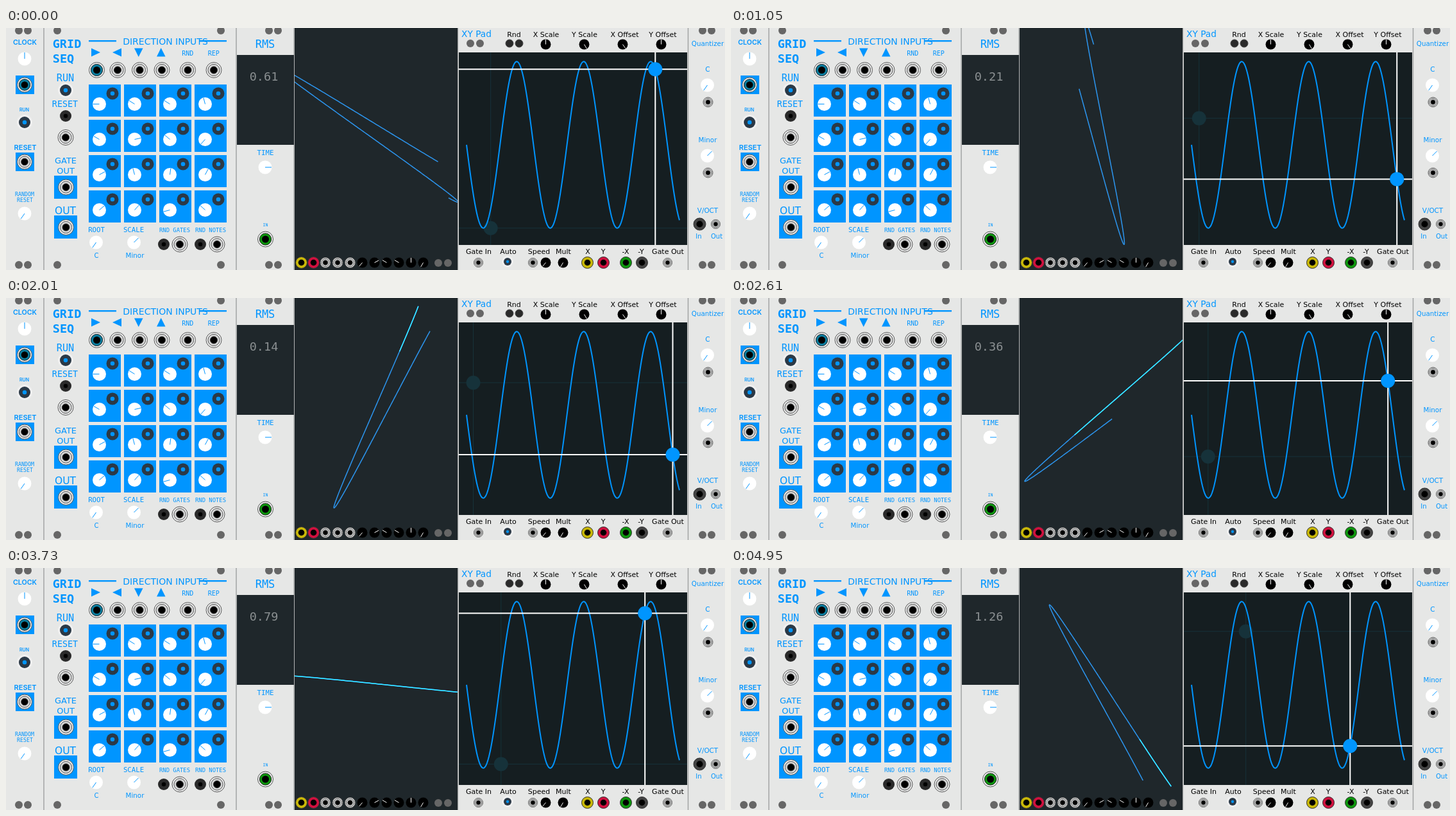
These frames come from a looping animation (1121 by 377 pixels, 5.05 s). An HTML page with a canvas:

```html
<!DOCTYPE html>
<html lang="en">
<head>
<meta charset="utf-8">
<title>Modular rack</title>
<style>
html, body { margin: 0; width: 100%; height: 100%; overflow: hidden; background: #e6e7e6; }
canvas { display: block; }
</style>
</head>
<body>
<canvas id="stage" width="1121" height="377"></canvas>
<script>
const W = 1121, H = 377, LOOP = 5050, TRAIL = 3900, TURN = 1550;
const BLUE = '#0095ff', PANEL = '#e6e7e6', SCREEN = '#1f272b', PAD = '#151e21';
const SANS = '"DejaVu Sans", sans-serif', MONO = '"DejaVu Sans Mono", monospace';
const ROUND = 'Inter, sans-serif';
const view = document.getElementById('stage').getContext('2d');
const rack = document.createElement('canvas');
rack.width = W;
rack.height = H;
let g = rack.getContext('2d');

// ---- drawing helpers ----
function box(x, y, w, h, fill) {
  g.fillStyle = fill;
  g.fillRect(x, y, w, h);
}

function disc(x, y, r, fill, edge, width = 1) {
  g.beginPath();
  g.arc(x, y, r, 0, Math.PI * 2);
  if (fill) { g.fillStyle = fill; g.fill(); }
  if (edge) { g.strokeStyle = edge; g.lineWidth = width; g.stroke(); }
}

function line(x1, y1, x2, y2, color, width) {
  g.beginPath();
  g.moveTo(x1, y1);
  g.lineTo(x2, y2);
  g.strokeStyle = color;
  g.lineWidth = width;
  g.stroke();
}

function label(text, x, y, size, font = SANS, color = BLUE, weight = '') {
  g.font = `${weight} ${size}px ${font}`;
  g.textAlign = 'center';
  g.fillStyle = color;
  g.fillText(text, x, y);
}

function knob(x, y, deg, r = 10.5, fill = '#fff', mark = BLUE) {
  const a = deg * Math.PI / 180;
  disc(x, y, r, fill);
  line(x, y, x + Math.sin(a) * r * 0.95, y - Math.cos(a) * r * 0.95, mark, 1);
}

function smallKnob(x, y, deg) {
  knob(x, y, deg, 8, '#000', '#fff');
}

function jack(x, y, r = 12, ring) {
  disc(x, y, r, '#eceded', '#555');
  disc(x, y, r * 0.76, ring || '#d4d5d5', ring ? '#222' : '#555');
  disc(x, y, r * 0.46, '#000', ring ? null : '#333');
}

function plug(x, y, color, r = 9) {
  disc(x, y, r, color, '#333');
  disc(x, y, r * 0.53, '#000');
}

function button(x, y, r, lit) {
  if (lit) disc(x, y, r + 3, 'rgba(255,255,255,0.4)');
  disc(x, y, r, lit ? '#2b3946' : '#2a2a2a');
  disc(x, y, r * 0.36, lit ? BLUE : '#000');
}

function poly(...p) {
  g.beginPath();
  for (let i = 0; i < p.length; i += 2) g.lineTo(p[i], p[i + 1]);
  g.fillStyle = BLUE;
  g.fill();
}

function dots(y, ...xs) {
  for (const x of xs) disc(x, y, 6, '#666');
}

// ---- modules ----
function drawClock() {
  dots(4, 20, 34);
  dots(369, 20, 34);
  label('CLOCK', 29.5, 26, 10.7, ROUND, BLUE, 600);
  knob(29, 48, 0);
  box(15, 74, 29, 29, BLUE);
  jack(29, 88.5, 11.5, '#0b7d9f');
  label('RUN', 28.5, 130, 7, ROUND, BLUE, 600);
  button(29, 147, 9, true);
  label('RESET', 30, 190, 11, ROUND, BLUE, 600);
  box(15, 194, 29, 29, BLUE);
  jack(29, 208.5, 11.5);
  label('RANDOM', 29, 262, 8.3, MONO);
  label('RESET', 29.5, 271, 8.3, MONO);
  knob(29, 289, -145);
}

function drawGrid() {
  dots(4, 80, 335);
  dots(369, 80, 335);
  label('GRID', 95, 31, 18.5, MONO, BLUE, 'bold');
  label('SEQ', 89.5, 54, 18.5, MONO, BLUE, 'bold');
  label('DIRECTION INPUTS', 248.5, 26, 12.7 + 1.3, MONO.replace(' Mono', '').replace('monospace', 'sans-serif'));
  box(129, 19, 43, 2.4, BLUE);
  box(302, 19, 42, 2.4, BLUE);
  poly(133, 31.5, 147, 38, 133, 44.5);
  poly(180, 31.5, 166, 38, 180, 44.5);
  poly(200, 31.5, 213.5, 31.5, 206.7, 45);
  poly(235, 44.5, 248.5, 44.5, 241.7, 31);
  label('RND', 283.2, 43, 10, MONO);
  label('REP', 323.7, 43, 10, MONO);
  jack(141.5, 65.5, 12, '#0b7d9f');
  for (const x of [174, 208.5, 243, 283.5, 324]) jack(x, 65.5);

  label('RUN', 92.5, 83, 15.3, MONO);
  button(93, 97, 9, true);
  label('RESET', 92, 123, 13.4, MONO);
  button(93, 137, 9);
  jack(93, 170.5);
  label('GATE', 93, 211, 13);
  label('OUT', 93, 227, 13);
  box(75, 230, 36, 36, BLUE);
  jack(93.5, 248);
  label('OUT', 92.5, 290, 15.5);
  box(75, 292, 36, 36, BLUE);
  jack(93.5, 310.5);

  const turns = [
    [-90, -58, -58, -15],
    [-60, 78, -50, -138],
    [62, -15, 8, 28],
    [50, 42, -105, -48]
  ];
  turns.forEach((row, j) => row.forEach((deg, i) => {
    const x = 129 + 55 * i, y = 88 + 55 * j;
    box(x, y, 50, 50, BLUE);
    knob(x + 16.5, y + 30.5, deg);
    disc(x + 37, y + 14, 9.5, '#2b3946');
    disc(x + 37, y + 14, 3.3, BLUE);
  }));

  label('ROOT', 141, 318, 10.7, MONO);
  label('SCALE', 199, 318, 10.7, MONO);
  knob(140.5, 334, -145);
  knob(199.5, 334, 45);
  label('C', 141, 358, 10);
  label('Minor', 201, 358, 10.3);
  label('RND GATES', 263, 318, 8.9, MONO);
  label('RND NOTES', 319, 318, 8.9, MONO);
  button(246, 337, 9);
  jack(271, 337);
  button(303, 337, 9);
  jack(329, 337);
}

function drawMeter() {
  dots(4, 410, 424);
  dots(369, 410, 424);
  label('RMS', 404, 31, 17, MONO);
  box(360, 42, 89, 140, SCREEN);
  label('TIME', 404.5, 198, 10.8, MONO);
  knob(404, 217, 90);
  label('IN', 404.5, 309, 6.6, MONO);
  jack(404.5, 329, 12, '#0d960d');
}

function drawScopeControls() {
  plug(460.5, 365.5, '#c9b808');
  plug(479.5, 365.5, '#d0103f');
  for (const x of [498, 517, 536.5]) jack(x, 365.5, 8);
  [-140, 62, -60, -60, 0, -150].forEach((deg, i) => smallKnob(555.5 + 19 * i, 365.5, deg));
  dots(366, 674, 689);
}

function drawPadPanel() {
  const ink = (text, x, y) => label(text, x, y, 11, SANS, '#000');
  label('XY Pad', 733.5, 14, 13.7);
  dots(24, 724, 739);
  ink('Rnd', 792, 14);
  ink('X Scale', 842, 14);
  ink('Y Scale', 902, 14);
  ink('X Offset', 964.5, 14);
  ink('Y Offset', 1024, 14);
  for (const x of [785, 800]) disc(x, 24, 6, '#2a2a2a', '#444');
  smallKnob(841.5, 25.5, 0);
  smallKnob(901.5, 25.5, 150);
  smallKnob(961.5, 25.5, 145);
  smallKnob(1021.5, 25.5, 0);
  box(706, 38, 356, 300, PAD);

  ink('Gate In', 737, 352);
  ink('Auto', 783, 352);
  ink('Speed', 831, 352);
  ink('Mult', 869, 352);
  ink('X', 907, 352);
  ink('Y', 931, 352);
  ink('-X', 966, 352);
  ink('-Y', 990, 352);
  ink('Gate Out', 1032, 352);
  for (const x of [736.5, 821.5, 1031.5]) jack(x, 365.5, 7);
  button(782, 364, 6, true);
  smallKnob(841.5, 365.5, -140);
  smallKnob(868.5, 365.5, -150);
  plug(906.5, 365.5, '#c9b808');
  plug(931.5, 365.5, '#d0103f');
  plug(966.5, 365.5, '#0d960d');
  plug(991.5, 365.5, '#444');
}

function drawQuantizer() {
  dots(4, 1086, 1100);
  dots(369, 1086, 1100);
  label('Quantizer', 1094, 28, 10.3);
  label('C', 1094, 68, 10.5);
  knob(1093.5, 89, -145);
  jack(1094.5, 115.5, 7.5);
  label('Minor', 1094, 178, 10.3);
  knob(1093.5, 199, 45);
  jack(1094.5, 225.5, 7.5);
  label('V/OCT', 1094, 288, 10.4);
  plug(1081.5, 305.5, '#444', 9.5);
  jack(1106.5, 305.5, 7);
  label('In', 1080, 328, 10);
  label('Out', 1108, 328, 10);
}

function drawRack() {
  box(0, 0, W, H, PANEL);
  for (const x of [59, 359, 449, 704.5, 1063.5]) line(x, 0, x, H, '#a2a4a4', 1.5);
  g.clearRect(450, 0, 254, H);
  drawClock();
  drawGrid();
  drawMeter();
  drawScopeControls();
  drawPadPanel();
  drawQuantizer();
}

// ---- motion ----
const travel = [[-4000, 912.4], [0, 1012.3], [1050, 1038.25], [1520, 1050], [1580, 1050],
  [2010, 1039.24], [2610, 1024.2], [3730, 996.2], [4420, 978.2], [4950, 965.3]];
const level = [[0, 0.61], [1050, 0.21], [1610, 0.005], [2010, 0.14], [2610, 0.36],
  [3730, 0.79], [4420, 1.05], [4950, 1.26]];
const spin = [[0, -236.6], [1050, -193.2], [2010, -153.95], [2610, -128.9],
  [3730, -82], [4420, -53.1], [4950, -30.92]];

function at(keys, t) {
  let i = 1;
  while (i < keys.length - 1 && t > keys[i][0]) i++;
  const [t0, a] = keys[i - 1], [t1, b] = keys[i];
  return a + (b - a) * (t - t0) / (t1 - t0);
}

// The display refreshes in steps: [first, last, count]
const ticks = [0];
for (const [a, b, n] of [[60, 530, 6], [610, 1050, 6], [1140, 1660, 7], [1740, 2180, 6],
  [2270, 2780, 7], [2870, 3390, 7], [3470, 3990, 7], [4070, 4510, 6], [4600, 4950, 5]]) {
  for (let i = 0; i < n; i++) ticks.push(Math.round((a + (b - a) * i / (n - 1)) / 10) * 10);
}

const wave = x => 182 + 129.7 * Math.sin((x - 718) / 104.4 * Math.PI * 2);

function trace(from, to, angle) {
  if (to <= from) return;
  const c = Math.cos(angle), s = Math.sin(angle);
  g.beginPath();
  const n = Math.ceil((to - from) / 12);
  for (let i = 0; i <= n; i++) {
    const x = at(travel, from + (to - from) * i / n);
    const u = 0.39 * (x - 1005.1) - 1.4;
    const v = 1.377 * (wave(x) - 52) - 153.8;
    g.lineTo(576.5 + c * u - s * v, 188.2 + s * u + c * v);
  }
  g.stroke();
}

function drawScope(t) {
  const angle = at(spin, t) * Math.PI / 180;
  box(449, 0, 256, H, SCREEN);
  g.save();
  g.beginPath();
  g.rect(449, 0, 256, H);
  g.clip();
  // Additive strokes: the retraced part glows cyan
  g.globalCompositeOperation = 'lighter';
  g.strokeStyle = 'rgb(12,110,196)';
  g.lineWidth = 1.5;
  g.lineJoin = 'round';
  trace(t - TRAIL, Math.min(t, TURN), angle);
  trace(Math.max(t - TRAIL, TURN), t, angle);
  g.restore();
}

function drawPad(t) {
  const x = at(travel, t), y = wave(x), gx = 1768 - x, gy = 376 - y;
  g.save();
  g.beginPath();
  g.rect(706, 38, 356, 300);
  g.clip();
  line(706, gy, 1062, gy, '#16323a', 1);
  line(gx, 38, gx, 338, '#16323a', 1);
  disc(gx, gy, 11, '#16323a');
  g.beginPath();
  for (let px = 718; px <= 1050; px++) g.lineTo(px, wave(px));
  g.strokeStyle = BLUE;
  g.lineWidth = 2;
  g.stroke();
  line(706, y, 1062, y, '#fff', 2);
  line(x, 38, x, 338, '#fff', 2);
  disc(x, y, 11, BLUE);
  g.restore();
}

function frame(now) {
  const clock = (now - start) % LOOP;
  let t = 0;
  for (const tick of ticks) if (tick <= clock) t = tick;
  g = view;
  drawScope(t);
  g.drawImage(rack, 0, 0);
  label(at(level, t).toFixed(2), 402, 82, 18.5, MONO, '#8b9092');
  drawPad(t);
}

function loop() {
  frame(performance.now());
  requestAnimationFrame(loop);
}

drawRack();
const start = performance.now();
loop();
</script>
</body>
</html>
```
